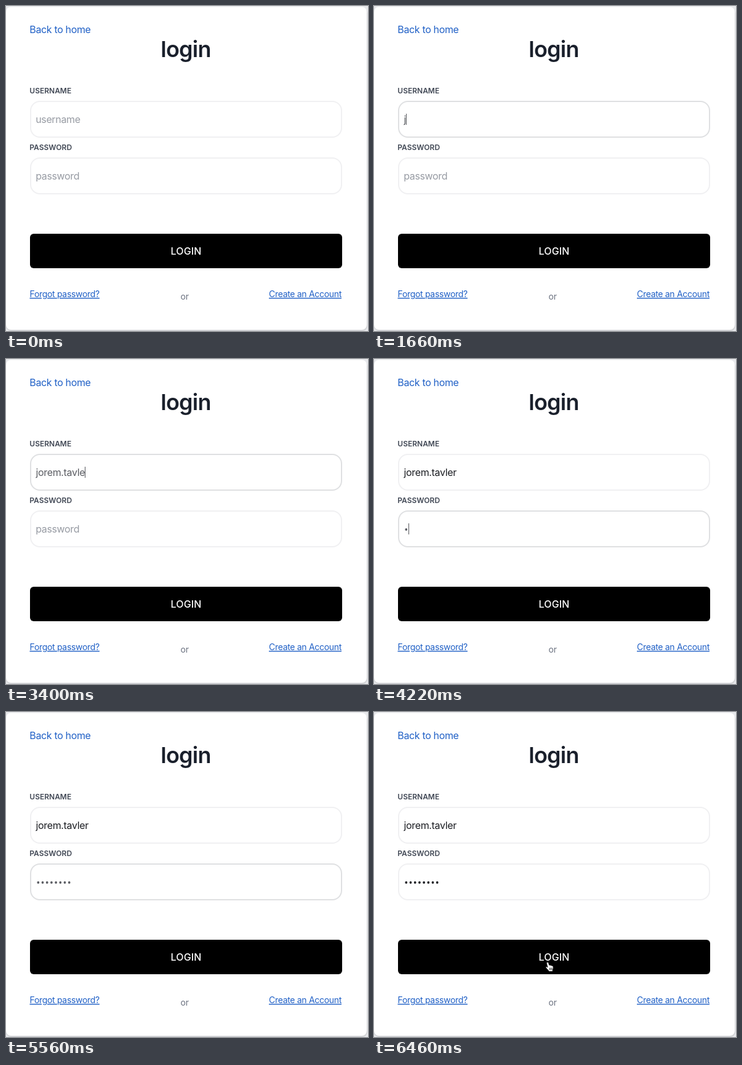
Recreate the animation shown at these times as an HTML page. Size 588 by 528 pixels, loop 6.48 s.

```html
<!DOCTYPE html>
<html lang="en">
<head>
<meta charset="utf-8">
<title>Login form</title>
<style>
  html, body { margin: 0; width: 100%; height: 100%; overflow: hidden; background: #e8e9ec; }
  svg { display: block; width: 588px; height: 528px; }
  text { font: 400 16px Inter, "Liberation Sans", sans-serif; letter-spacing: -.35px; white-space: pre; }
  .label { font-size: 12px; font-weight: 600; letter-spacing: 0; fill: #414855; }
  .link { fill: #2060c6; }
  .small { font-size: 14px; letter-spacing: -.31px; }
  .under { text-decoration: underline; }
  .title { font-size: 36px; font-weight: 600; letter-spacing: -.8px; fill: #1a202c; }
  .hint { fill: #979ba3; }
  .box { fill: #fff; stroke-width: 2; }
</style>
</head>
<body>
<svg viewBox="0 0 588 528">
  <defs>
    <g id="arrow">
      <path d="M.5 .8V15.2L4 12l2.3 5.3 2.5-1.1-2.3-5.1H11.2Z" fill="#000" opacity=".18"/>
      <path d="M0 0V14.4L3.5 11.2 5.8 16.4 8.3 15.3 6 10.2H10.4Z" fill="#000" stroke="#fff" stroke-width=".9"/>
    </g>
    <g id="beam" fill="none" stroke-linecap="round">
      <path id="beamLine" d="M-3 -8Q0 -8 0 -6 0 -8 3 -8M0 -6V6M-3 8Q0 8 0 6 0 8 3 8M-1.7 2.5H1.7" stroke="#fff" stroke-width="2.4"/>
      <use href="#beamLine" stroke="#111"/>
      <path d="M-3 -8Q0 -8 0 -6 0 -8 3 -8M0 -6V6M-3 8Q0 8 0 6 0 8 3 8M-1.7 2.5H1.7" stroke="#111" stroke-width="1.1"/>
    </g>
    <g id="hand" stroke-linejoin="round" stroke-linecap="round">
      <path d="M3.3 .6C4.6 .2 5.4 1 5.7 2.1L6.6 5.3C7.4 4.8 8.3 5 8.7 5.8 9.6 5.3 10.4 5.6 10.8 6.4 12 6 12.8 6.6 13 7.7 13.4 9.6 13 11.4 12.3 12.7L12.1 15.5H6.1C5.6 13.7 3.4 12 1.4 9.6 .4 8.4 1.4 7.2 2.6 7.8L4 8.8 2.4 2.6C2.1 1.6 2.5 .9 3.3 .6Z" fill="#fff" stroke="#000" stroke-width=".8"/>
      <path d="M7.2 10V13M9.1 9.9V13M11 9.8V13" fill="none" stroke="#000" stroke-width=".8"/>
    </g>
  </defs>

  <rect width="588" height="528" fill="#e8e9ec"/>
  <rect y="4" width="587" height="524" rx="8" fill="#d3d4d7"/>
  <rect y="1.5" width="586" height="524.5" rx="8" fill="#fff"/>

  <text class="link" x="38.3" y="44">Back to home</text>
  <text class="title" x="292" y="83" text-anchor="middle">login</text>

  <text class="label" x="38.3" y="142">USERNAME</text>
  <rect id="userBox" class="box" x="40" y="155" width="505" height="58" rx="15"/>
  <text id="userHint" class="hint" x="48.2" y="190">username</text>
  <text id="user" x="48.5" y="190"></text>

  <text class="label" x="38.3" y="234">PASSWORD</text>
  <rect id="passBox" class="box" x="40" y="247" width="505" height="58" rx="15"/>
  <text id="passHint" class="hint" x="48.2" y="282">password</text>
  <g id="dots"></g>
  <rect id="caret" width="1" height="18" fill="#55575c"/>

  <rect x="39" y="370" width="507" height="56" rx="6"/>
  <text x="292.5" y="404" text-anchor="middle" fill="#fff" style="font-weight:500;letter-spacing:.1px">LOGIN</text>

  <text class="link small under" x="38.5" y="473">Forgot password?</text>
  <text class="small" x="283.6" y="477" fill="#6b7280">or</text>
  <text class="link small under" x="427" y="473">Create an Account</text>
  <g id="pointers"></g>
</svg>
<script>
const LOOP = 6480;
const NAME = "jorem.tavler";
const USER_KEYS = [1600, 1800, 1960, 2100, 2440, 2600, 2820, 2960, 3080, 3240, 3400, 3560];
const PASS_KEYS = [4200, 4380, 4540, 4700, 4880, 5000, 5120, 5140];
const FOCUS_USER = 1400, FOCUS_PASS = 3780, CARET_OFF = 5440, BLUR = 6440;
const HOLD = 180, FADE = 180;

// shape, x, y, start, and an end for a pointer that stays
const POINTERS = [
  ["arrow", 462, 24, 440],
  ["arrow", 256.5, 112.5, 620],
  ["beam", 94.5, 183.5, 760, 1600],
  ["beam", 94.5, 183.5, 5580],
  ["arrow", 31, 290, 5680],
  ["hand", 117, 384, 5780],
  ["hand", 219, 398, 5820],
  ["hand", 278, 406, 5980, LOOP]
];

const $ = id => document.getElementById(id);
const make = (tag, attrs, parent) => {
  const el = document.createElementNS("http://www.w3.org/2000/svg", tag);
  for (const k in attrs) el.setAttribute(k, attrs[k]);
  return parent.appendChild(el);
};
const show = (el, on) => el.setAttribute("visibility", on ? "visible" : "hidden");
const typed = (keys, t) => keys.filter(k => t >= k).length;

const dots = PASS_KEYS.map((_, i) =>
  make("circle", { cx: 52.3 + 7.2 * i, cy: 277, r: 1.9 }, $("dots")));
const pointers = POINTERS.map(([shape, x, y]) =>
  make("use", { href: "#" + shape, transform: `translate(${x} ${y})` }, $("pointers")));

function pointerAlpha(start, end, t) {
  if (t < start) return 0;
  if (end) return t < end ? 1 : 0;
  return Math.max(0, Math.min(1, 1 - (t - start - HOLD) / FADE));
}

function render(t) {
  const inUser = t >= FOCUS_USER && t < FOCUS_PASS;
  const inPass = t >= FOCUS_PASS && t < BLUR;
  const letters = typed(USER_KEYS, t);
  const count = typed(PASS_KEYS, t);
  const border = on => on ? "#dfe0e2" : "#f0f0f2";
  const ink = on => on ? "#5b5d63" : "#1b1d22";

  $("userBox").setAttribute("stroke", border(inUser));
  $("passBox").setAttribute("stroke", border(inPass));
  $("user").textContent = NAME.slice(0, letters);
  $("user").setAttribute("fill", ink(inUser));
  $("dots").setAttribute("fill", ink(inPass));
  dots.forEach((d, i) => show(d, i < count));
  show($("userHint"), !letters);
  show($("passHint"), !count);

  const userEnd = letters ? $("user").getComputedTextLength() : 0;
  $("caret").setAttribute("x", Math.round(inUser ? 48.5 + userEnd : 49 + 7.2 * count));
  $("caret").setAttribute("y", inUser ? 175 : 267);
  show($("caret"), inUser || (inPass && t < CARET_OFF));

  pointers.forEach((p, i) =>
    p.setAttribute("opacity", pointerAlpha(POINTERS[i][3], POINTERS[i][4], t)));
}

function tick() {
  render(performance.now() % LOOP);
  requestAnimationFrame(tick);
}
tick();
</script>
</body>
</html>
```
